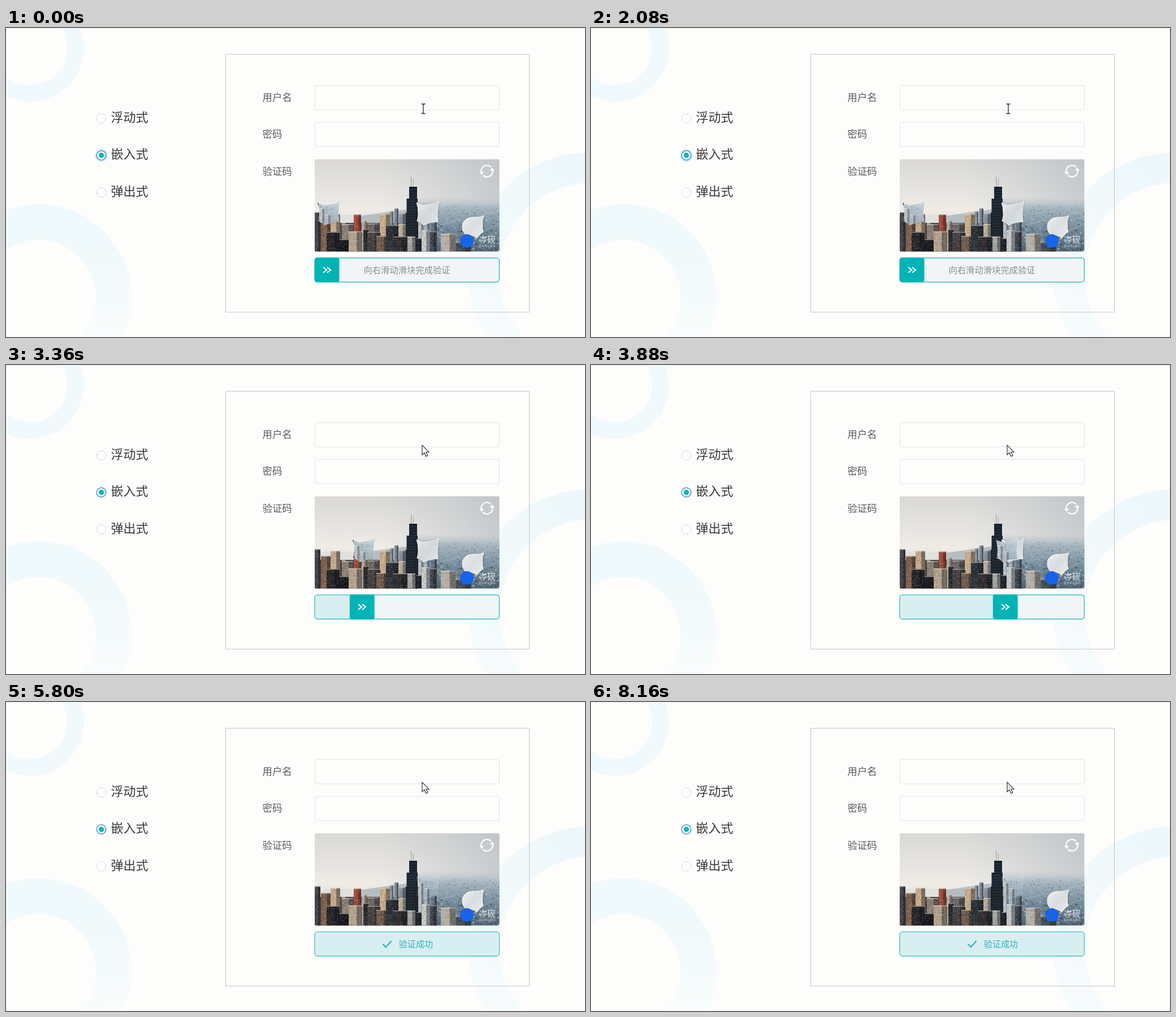
These frames come from a looping animation (1024x547 px, 8200 ms). An HTML page:

```html
<!DOCTYPE html>
<html lang="zh-CN">
<head>
<meta charset="utf-8">
<title>滑块验证</title>
<style>
  html, body { margin: 0; width: 100%; height: 100%; overflow: hidden; background: #fdfdfb; }
  svg { display: block; width: 100%; height: 100%; }
  text { font-family: "Noto Sans CJK SC", "Noto Sans CJK", "Noto Sans", sans-serif; }
</style>
</head>
<body>
<svg viewBox="0 0 1024 547">
  <defs>
    <linearGradient id="sky" x1="0" y1="0" x2="0" y2="1">
      <stop offset="0" stop-color="#d9d8d6"/>
      <stop offset=".3" stop-color="#e5e3df"/>
      <stop offset=".55" stop-color="#efece6"/>
      <stop offset=".7" stop-color="#dfe0de"/>
    </linearGradient>
    <linearGradient id="dusk">
      <stop offset=".35" stop-color="#b9c1c8" stop-opacity="0"/>
      <stop offset="1" stop-color="#b0b9c1" stop-opacity=".6"/>
    </linearGradient>
    <linearGradient id="haze" x1="0" y1="0" x2="0" y2="1">
      <stop offset="0" stop-color="#c3ccd2" stop-opacity="0"/>
      <stop offset=".2" stop-color="#a9b8c2"/>
      <stop offset=".55" stop-color="#7b91a0"/>
      <stop offset="1" stop-color="#4c606f"/>
    </linearGradient>
    <linearGradient id="fadeDown" x1="0" y1="0" x2="0" y2="1">
      <stop offset=".2" stop-color="#f0f9fb"/>
      <stop offset=".75" stop-color="#f8fcfc"/>
    </linearGradient>
    <linearGradient id="fadeSide" x1="1" y1="0" x2="0" y2="1">
      <stop offset=".2" stop-color="#ecf7fb"/>
      <stop offset=".85" stop-color="#f6fbfc"/>
    </linearGradient>
    <linearGradient id="pillow" x1="0" y1="0" x2="1" y2="1">
      <stop offset="0" stop-color="#f0f1f2"/>
      <stop offset=".5" stop-color="#d9dddf"/>
      <stop offset="1" stop-color="#eceeef"/>
    </linearGradient>
    <linearGradient id="sheen">
      <stop offset="0" stop-color="#e9eff5" stop-opacity=".2"/>
      <stop offset="1" stop-color="#e4ecf4"/>
    </linearGradient>
    <filter id="soft" x="-20%" y="-20%" width="140%" height="140%">
      <feGaussianBlur stdDeviation="1.6"/>
    </filter>
    <clipPath id="frame"><rect x="546" y="232.5" width="326.5" height="163" rx="2"/></clipPath>
    <path id="slot" d="M726 309Q736 316 747 312Q758 311 766 306Q761 325 764 343Q750 343 738 349Q733 342 727 342Q732 326 726 309Z"/>
    <path id="decoy" d="M807 352C807 341 815 335 825 335C833 335 838 335 845 332Q840 345 844 361Q838 364 833 372Q826 366 812 365Q807 360 807 352Z"/>
    <clipPath id="cut"><use href="#slot"/></clipPath>
    <g id="photo"></g>
  </defs>

  <rect width="1024" height="547" fill="#fdfdfb"/>
  <rect width="1024" height="1.6" fill="#f3f3e8"/>
  <g fill="none">
    <circle cx="42" cy="35" r="81" stroke="#f0f9fb" stroke-width="29"/>
    <circle cx="57" cy="477" r="133.5" stroke="url(#fadeDown)" stroke-width="63"/>
    <circle cx="1035" cy="437" r="190" stroke="url(#fadeSide)" stroke-width="54"/>
  </g>

  <g id="options"></g>

  <g fill="none">
    <rect x="388.5" y="46.5" width="537" height="456.5" stroke="#c6c6c9"/>
    <rect x="546.5" y="102" width="326" height="43" rx="2" fill="#fdfdfc" stroke="#e3e4dc"/>
    <rect x="546.5" y="167" width="326" height="43" rx="2" fill="#fdfdfc" stroke="#e2e3ec"/>
  </g>
  <g font-size="17.4" fill="#5a5a5a">
    <text x="453.5" y="128.7">用户名</text>
    <text x="453.5" y="194">密码</text>
    <text x="453.5" y="259.6">验证码</text>
  </g>

  <g clip-path="url(#frame)">
    <use href="#photo"/>
    <use href="#decoy" fill="#333" opacity=".5" filter="url(#soft)"/>
    <use href="#decoy" fill="url(#pillow)" stroke="#f5f5f5"/>
    <circle cx="815" cy="377" r="12" fill="#1764e6"/>
    <text x="836" y="380" font-size="15" fill="#f4f6f8" opacity=".9">岑砚</text>
    <text x="836" y="387" font-size="5" fill="#eef2f5" opacity=".8">安全验证服务</text>
    <g id="gap">
      <use href="#slot" fill="#333" opacity=".5" filter="url(#soft)"/>
      <use href="#slot" fill="url(#pillow)" stroke="#f5f5f5" opacity=".95"/>
    </g>
    <g id="piece">
      <g clip-path="url(#cut)">
        <use href="#photo"/>
        <use id="gloss" href="#slot" fill="url(#sheen)"/>
      </g>
      <use id="rim" href="#slot" fill="none" stroke="#fff"/>
    </g>
    <g stroke="#fff" fill="none" stroke-width="2.4">
      <path d="M840.8 256A10 10 0 0 1 857.6 246.4M860.2 251A10 10 0 0 1 843.4 260.6"/>
      <path d="M837 254.5L841 260L845.5 255ZM855.5 252L860 247L864 252.5Z" fill="#fff" stroke="none"/>
    </g>
  </g>

  <g>
    <rect id="track" x="546" y="407" width="326.5" height="42.8" rx="5" stroke-width="1.5"/>
    <rect id="trail" x="546.8" y="407.8" height="41.2" rx="4" fill="#d9eef1"/>
    <text id="hint" x="632.5" y="433.8" font-size="15.3" fill="#8c8c8c">向右滑动滑块完成验证</text>
    <g id="handle">
      <rect id="shade" x="546" y="407" width="43.5" height="43" rx="4" fill="#00b4b8" opacity=".5" filter="url(#soft)"/>
      <rect x="546" y="406.5" width="43.5" height="43.5" rx="4" fill="#00b4b6"/>
      <path d="M561 423.5L567 428.3L561 433M568 423.5L574 428.3L568 433" fill="none" stroke="#fff" stroke-width="2.2"/>
    </g>
    <g id="done">
      <path d="M666.5 428.5L671.8 434L681.5 423" fill="none" stroke="#28b3b3" stroke-width="2.2"/>
      <text x="694.5" y="433.8" font-size="15.2" fill="#31b5b2">验证成功</text>
    </g>
  </g>

  <path id="beam" d="M734.5 134.5H737L738 135.5L739 134.5H741.5M738 135.5V150.5M734.5 151.5H737L738 150.5L739 151.5H741.5" fill="none" stroke="#222" stroke-width="1.3"/>
  <path id="arrow" d="M736 142V159L740 155.3L742.8 161.8L745.8 160.5L743 154.2H748Z" fill="#fff" stroke="#222" stroke-width="1.1"/>
</svg>

<script>
const LOOP = 8200, STEP = 40;
const PRESS = 2720, DONE = 4640, TARGET = 175;
// Drag path: time, distance
const DRAG = [[2800, 0], [3360, 62], [3880, 165], [4200, TARGET]];

const $ = id => document.getElementById(id);
const show = (id, on) => $(id).setAttribute('display', on ? 'inline' : 'none');

let seed = 11;
const rand = (a = 0, b = 1) => {
  seed = (seed * 16807) % 2147483647;
  return a + (b - a) * seed / 2147483647;
};
const pick = list => list[Math.floor(rand(0, list.length))];
const box = (x, y, w, h, fill, o = 1) =>
  `<rect x="${x.toFixed(1)}" y="${y.toFixed(1)}" width="${w.toFixed(1)}" height="${h.toFixed(1)}" fill="${fill}" opacity="${o}"/>`;

// x, roof, width, colour
const FAR = [
  [546, 326, 10, '#454448'], [557, 338, 18, '#80604d'], [574, 329, 17, '#c4a98c'],
  [594, 347, 20, '#8b8176'], [615, 330, 13, '#a34c3c'], [629, 341, 9, '#b5aaa0'],
  [639, 346, 20, '#716a66'], [661, 329, 18, '#c9ad8c'], [679, 324, 6, '#8794a0'],
  [687, 319, 7, '#77838e'], [695, 328, 11, '#8b939a'], [729, 319, 9, '#b9c0c5'],
  [739, 330, 10, '#a6b1ba'], [752, 341, 10, '#637583']
];
const NEAR = [
  [567, 361, 23, '#26262b'], [590, 374, 17, '#1b1a1f'], [606, 360, 24, '#b3a28d'],
  [632, 356, 9, '#2c2d32'], [639, 361, 23, '#444140'], [655, 368, 22, '#6e5b4c'],
  [672, 349, 22, '#2a3339'], [694, 347, 13, '#b9ae9d'], [685, 369, 25, '#312d31'],
  [710, 369, 14, '#a5a6a3'], [726, 372, 21, '#202128'], [735, 358, 14, '#c6c9c8'],
  [750, 360, 11, '#40434c'], [769, 364, 26, '#b3aea5'], [796, 379, 26, '#414b55']
];

function building([x, y, w, fill]) {
  const h = 396 - y;
  let s = box(x, y, w, h, fill) + box(x + w * .6, y, w * .4, h, '#0c1016', .4) + box(x, y, w, 1.5, '#eee7da', .5);
  for (let r = y + 4; r < 394; r += 4)
    for (let c = x + 1.5; c < x + w - 2; c += 3.5)
      s += box(c, r, 1.5, 2, rand() < .5 ? '#e9dfcf' : '#15171c', .22);
  return s;
}

function photo() {
  let s = box(546, 232, 327, 164, 'url(#sky)') + box(546, 232, 327, 100, 'url(#dusk)');
  s += box(546, 331, 180, 16, '#e0e0dc') + '<path d="M620 334Q670 326 726 319V350H620Z" fill="#a6b2ba" opacity=".75"/>';
  s += box(722, 298, 151, 98, 'url(#haze)');
  for (let i = 0; i < 330; i++) {
    const d = rand(), y = 313 + 80 * d;
    s += box(rand(728, 871), y, 1.5 + 5 * d * rand(), 1 + 3 * d * rand(), pick(['#d5dce0', '#394c5b', '#4d6371', '#a9b4bb', '#2c3b47']), .55);
  }
  s += '<path d="M767 349L873 324M775 391L873 346M760 361L850 393" stroke="#bfc8cc" stroke-width="1.3" opacity=".4"/>';
  s += box(546, 345, 182, 51, '#454041');
  for (let i = 0; i < 70; i++)
    s += box(rand(546, 760), rand(342, 387), rand(3, 8), rand(4, 12), pick(['#222327', '#92897e', '#5c5049', '#c4b9aa']), .8);
  s += FAR.map(building).join('');
  s += box(716.4, 264, .8, 17, '#555b63', .6) + box(720.2, 268, .7, 13, '#555b63', .6);
  s += box(713, 281, 14, 115, '#18222d') + box(708.5, 302, 19.5, 94, '#1b2631') + box(706.5, 327, 22.5, 69, '#1c242c');
  for (let y = 286; y < 380; y += 5) s += box(y < 303 ? 713 : 709, y, 14, .8, '#465360', .5);
  return s + NEAR.map(building).join('');
}
$('photo').innerHTML = photo();

$('options').innerHTML = ['浮动式', '嵌入式', '弹出式'].map((label, i) => {
  const y = 160 + i * 65.5, on = i === 1;
  return (on ? `<circle id="focus" cx="168.6" cy="${y}" r="10" fill="none" stroke="#cce8f6" stroke-width="2.4"/>` : '') +
    `<circle cx="168.6" cy="${y}" r="8.3" fill="#fff" stroke="${on ? '#368fc8' : '#d8d8da'}" stroke-width="${on ? 1.4 : 1}"/>` +
    (on ? `<circle cx="168.6" cy="${y}" r="4.7" fill="#12b3b8"/>` : '') +
    `<text x="185.5" y="${y + 5.6}" font-size="22" fill="#383838">${label}</text>`;
}).join('');

// Smooth path through the drag points
function drag(t) {
  const n = DRAG.length - 1;
  if (t <= DRAG[0][0]) return 0;
  if (t >= DRAG[n][0]) return TARGET;
  const i = DRAG.findIndex(p => p[0] > t) - 1;
  const [t0, a] = DRAG[i], [t1, b] = DRAG[i + 1], d = t1 - t0, u = (t - t0) / d;
  const slope = k => {
    if (k === 0 || k === n) return 0;
    const g = j => (DRAG[j + 1][1] - DRAG[j][1]) / (DRAG[j + 1][0] - DRAG[j][0]);
    return 2 * g(k - 1) * g(k) / (g(k - 1) + g(k));
  };
  const e = u * u * (3 - 2 * u);
  return a + (b - a) * e + d * (slope(i) * u * (1 - u) ** 2 - slope(i + 1) * u * u * (1 - u));
}

function draw(t) {
  const pressed = t >= PRESS, done = t >= DONE, x = drag(t);
  show('beam', !pressed);
  show('arrow', pressed);
  show('focus', !pressed);
  show('hint', !pressed);
  show('handle', !done);
  show('shade', pressed);
  show('done', done);
  show('gap', !done);
  $('handle').setAttribute('transform', `translate(${x} 0)`);
  $('piece').setAttribute('transform', `translate(${x - TARGET} 0)`);
  $('gloss').setAttribute('opacity', done ? .15 : .35);
  $('rim').setAttribute('opacity', done ? .18 : .28);
  $('trail').setAttribute('width', done ? 325 : x + 2);
  $('track').setAttribute('fill', done ? '#dbeef1' : '#f1f5f8');
  $('track').setAttribute('stroke', done ? '#45c1c2' : '#35c0c3');
}

const start = performance.now();
function tick() {
  const t = (performance.now() - start) % LOOP;
  draw(Math.floor(t / STEP) * STEP);
  requestAnimationFrame(tick);
}
tick();
</script>
</body>
</html>
```
